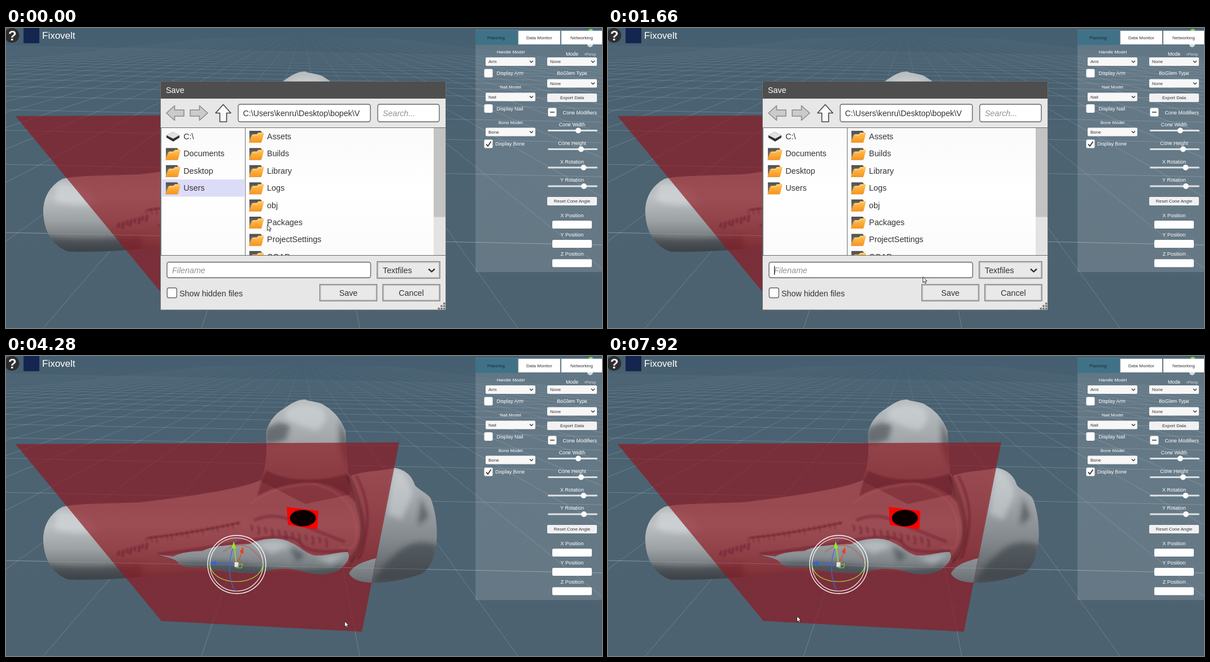
An HTML page for the animation above (8000 ms loop, 1055x531 px).

```html
<!DOCTYPE html>
<html lang="en">
<head>
<meta charset="utf-8">
<title>Save dialog</title>
<style>
  html, body { margin: 0; width: 100%; height: 100%; overflow: hidden; background: #4c6271; }
  svg { display: block; width: 100vw; height: 100vh; }
  text { font-family: "Liberation Sans", Arial, sans-serif; white-space: pre; }
</style>
</head>
<body>
<svg id="stage" viewBox="0 0 1055 531" preserveAspectRatio="none"></svg>
<script>
const LOOP = 8000;

// ---- drawing helpers
const text = (x, y, str, size, fill = '#fff', more = '') =>
  `<text x="${x}" y="${y + size * 0.355}" font-size="${size}" fill="${fill}" ${more}>${str}</text>`;
const mid = (x, y, str, size, fill) => text(x, y, str, size, fill, 'text-anchor="middle"');
const rect = (x, y, w, h, fill, more = '') =>
  `<rect x="${x}" y="${y}" width="${w}" height="${h}" fill="${fill}" ${more}/>`;
const circle = (x, y, r, fill, more = '') =>
  `<circle cx="${x}" cy="${y}" r="${r}" fill="${fill}" ${more}/>`;
const path = (d, fill, more = '') => `<path d="${d}" fill="${fill}" ${more}/>`;
const line = (d, stroke, width = 1, more = '') =>
  path(d, 'none', `stroke="${stroke}" stroke-width="${width}" ${more}`);
const group = (id, body, more = '') => `<g id="${id}" ${more}>${body}</g>`;
const range = (n, fn) => Array.from({ length: n }, (_, i) => fn(i)).join('');
const gradient = (id, y1, y2, ...stops) =>
  `<linearGradient id="${id}" gradientUnits="userSpaceOnUse" x1="0" x2="0" y1="${y1}" y2="${y2}">` +
  stops.map(([at, c, o = 1]) => `<stop offset="${at}" stop-color="${c}" stop-opacity="${o}"/>`).join('') + '</linearGradient>';
const clip = (id, d) => `<clipPath id="${id}">${path(d, '#000')}</clipPath>`;
const blur = (id, amount) => `<filter id="${id}" filterUnits="userSpaceOnUse" x="0" y="0" width="1055" height="531">` +
  `<feGaussianBlur stdDeviation="${amount}"/></filter>`;

const PLANE = 'M17 156L696 153L630 488L275 469Z';
const SHAFT = 'M66 328C65 303 76 280 100 267C120 261 190 261 236 259C290 253 330 247 360 242C400 235 430 229 453 219' +
  'L606 207C628 240 636 300 622 350L606 366C590 385 550 389 500 381L400 384C350 378 320 380 285 387' +
  'C225 393 170 397 112 396C88 389 68 367 66 328Z';
const TALUS = 'M452 222C459 200 461 180 461 157L460 139C462 118 479 100 492 93C503 85 515 77 529 77' +
  'C540 82 553 79 566 89C580 97 594 113 601 133L604 190L609 245L530 262Z';
const HEEL = 'M608 213C637 202 660 205 688 198C704 201 718 209 724 229C735 240 751 246 753 255' +
  'C762 281 764 307 762 330C760 353 752 376 735 386C690 401 645 406 622 399L607 384L621 350C636 305 626 250 608 213Z';
const FRONT = 'M265 351L296 355C310 347 330 346 348 345C367 335 400 334 431 333C450 323 485 318 506 331' +
  'C519 336 529 349 546 353C570 354 588 346 605 347C612 359 600 369 592 376C578 387 553 389 532 383' +
  'C500 374 480 375 453 383C420 387 380 381 345 373C325 376 310 373 305 366C302 360 285 355 265 351Z';
const SPUR = 'M607 385C615 371 628 365 655 358L647 401C625 401 612 394 607 385Z';

const defs = '<defs>' +
  gradient('sky', 0, 531, [0, '#465f70'], [0.4, '#4c6372'], [1, '#4d6270']) +
  gradient('depth', 15, 170, [0, '#d5e0e6', 0.04], [0.4, '#d5e0e6', 0.16], [1, '#d5e0e6', 0.3]) +
  gradient('shaft', 258, 397, [0, '#b0b5b8'], [0.3, '#bcc0c3'], [0.6, '#9ca1a4'], [0.83, '#74797c'], [1, '#4a4e51']) +
  gradient('talus', 77, 240, [0, '#b9bec0'], [0.35, '#a7acaf'], [0.6, '#969b9f'], [1, '#74797d']) +
  gradient('heel', 198, 405, [0, '#b4b9bc'], [0.3, '#9fa4a8'], [0.65, '#7f8589'], [1, '#52575b']) +
  gradient('front', 320, 388, [0, '#a0a5a8'], [0.5, '#8a8f93'], [1, '#666c70']) +
  gradient('spur', 358, 402, [0, '#8f9498'], [1, '#686e72']) +
  gradient('back', 0, 22, [0, '#4a4a4a'], [1, '#8a8a8a']) +
  gradient('flap', 4, 22, [0, '#ffc45a'], [1, '#f7941d']) +
  gradient('list', 177, 402, [0, '#fafafa'], [0.5, '#ffffff'], [1, '#fbfbfb']) +
  blur('soft', 5) + blur('fine', 1.2) +
  clip('inPlane', PLANE) + clip('inShaft', SHAFT) + clip('inTalus', TALUS) + clip('inHeel', HEEL) + clip('inFront', FRONT) +
  clip('inList', 'M275 177H778V402H275Z') + '</defs>';

// ---- 3D scene
function grid() {
  const across = range(22, i => {
    const y = 724 / (i + 2);
    return line(`M0 ${y}L1055 ${y + 22}`, '#d5e0e6', 0.8, `opacity="${Math.max(0.08, 0.32 - i * 0.014)}"`);
  });
  const away = range(33, i => {
    const dx = (i - 16) * 280 - 179;
    return line(`M${525 + dx * 0.035} 18L${525 + dx} 531`, 'url(#depth)', 0.8);
  });
  return across + away;
}

// blurred light and dark patches inside one bone part
const shade = (part, dark, light) => `<g clip-path="url(#in${part})"><g filter="url(#soft)">` +
  path(dark, '#2e3438', 'opacity=".5"') + path(light, '#e4e8ea', 'opacity=".4"') + '</g></g>';

function bone() {
  const teeth = range(8, i => line(`M${201 + i * 7} ${345 - i * 2}l${-3 + i % 3} ${8 + i % 2 * 4}`, '#5b1a27', 4, 'opacity=".5"')) +
    range(19, i => line(`M${247 + i * 9} ${322 - i * 1.6}l3 ${6 + i % 3 * 3}`, '#5b1a27', 2.2, 'opacity=".38"')) +
    range(12, i => line(`M${433 + i * 12} ${299 + i * 2.2}q5 5 2 ${10 + i % 2 * 5}`, '#5b1a27', 4, 'opacity=".38"'));
  const tinted = path('M452 222L461 203Q490 218 530 219T606 208L618 258Q582 222 530 224Q478 229 445 248Z', '#5b1723', 'opacity=".45"') +
    line('M606 213Q622 248 630 290T609 362', '#4e1520', 9, 'opacity=".36"') +
    line('M620 212Q646 260 638 310T622 357', '#4e1520', 5, 'opacity=".26"') +
    line('M432 262Q480 226 548 227Q614 246 619 300T591 337', '#b4606a', 4, 'opacity=".25"') +
    line('M250 322Q330 314 414 295', '#561520', 3, 'opacity=".5"') +
    line('M439 291Q472 276 506 291T600 329', '#561520', 6, 'opacity=".25"') +
    line('M268 351Q350 342 430 327T522 332T606 344', '#561520', 6, 'opacity=".28"') + teeth;
  return path(SHAFT, 'url(#shaft)') +
    shade('Shaft', 'M68 368Q130 378 240 368V400H80Z', 'M90 276Q120 270 150 290L165 312Q110 318 85 305Z') +
    path(HEEL, 'url(#heel)') +
    shade('Heel', 'M690 350Q720 320 765 335V400H650Q665 370 690 350ZM735 250L748 285L729 300Z',
      'M686 198Q712 206 720 245L700 290L675 280Z') +
    path(TALUS, 'url(#talus)') +
    shade('Talus', 'M458 128L482 118L503 122L496 148L474 155H455ZM590 110L606 150V205L590 160Z',
      'M495 96Q530 78 560 94Q575 115 550 132Q520 126 495 110Z') +
    path(PLANE, '#8f1922', 'opacity=".69"') +
    `<g clip-path="url(#inPlane)">${group('tint', tinted, 'filter="url(#fine)"')}</g>` +
    path(FRONT, 'url(#front)') +
    shade('Front', 'M300 366Q370 360 450 372T595 370V392H300ZM500 335L530 352L515 365Z',
      'M440 335Q480 318 504 337L470 350ZM548 357L604 350L575 368Z') +
    path(SPUR, 'url(#spur)') +
    line('M0 362L1055 384', '#d5e0e6', 0.8, 'opacity=".25"');
}

const marker = path('M497 267L553 274L551 307L499 299Z', '#fe0000') +
  '<ellipse cx="525.5" cy="287" rx="23" ry="14.5" fill="#0b0000"/>';

const gizmo =
  circle(408.5, 369, 51.5, 'none', 'stroke="#fff" stroke-width="1.3"') +
  circle(408, 369, 47, 'none', 'stroke="#f4f4f4" stroke-width="1.2"') +
  line('M361 367C362 410 453 410 455 367', '#a4dc3a', 1.2) +
  line('M384 347Q423 316 454 363', '#d9442f', 1) +
  line('M409 323Q385 369 404 415', '#3d66d8', 1.2) +
  line('M408 369L404 338', '#9be628', 1.4) + line('M408 369L418 348', '#e8452e', 1.4) + line('M406 369L370 367', '#3a6be6', 1.4) +
  path('M403 328L407 340Q403 342 399.500 340Z', '#8cf019') +
  path('M420 338L420.500 349Q416 350 414 346Z', '#f13c20') +
  path('M361 367L371 363Q373 367 371 371Z', '#2f62df') +
  rect(404.5, 365, 7, 8.5, '#e4e4e4') + path('M411 369L419 368L417 375L408 375Z', 'none', 'stroke="#8ed62a"') +
  line('M409 365L413 361L418 363', '#ef4a32', 1);

// ---- side panel
const label = (y, str, size = 8.9, x = 1002) => mid(x, y, str, size);
const drop = (x, y, str) => rect(x, y - 7.5, 88, 15, '#f7f7f7', 'rx="2"') + text(x + 5, y, str, 8, '#333') +
  line(`M${x + 78} ${y - 1.5}l3 3l3 -3`, '#333', 1.3);
const button = (y, str) => rect(958, y - 7.5, 88, 15, '#f1f1f3', 'rx="2"') + mid(1002, y, str, 8, '#333');
const box = (x, y, s = 15) => rect(x, y - s / 2, s, s, '#fdfdfd', 'rx="2.5"');
const slider = (y, x) => rect(959, y - 1.5, 88, 3, '#dfe3e6', 'rx="1.5"') + circle(x, y, 5, '#fafafa');

const panel =
  line('M1035 8V30', '#8b9ba4', 1) + path('M1031 3Q1035 0 1039 3L1036 10Z', '#7be03a') + circle(1034, 29, 5, '#d8dcde') +
  rect(831, 3, 224, 429, '#d6dade', 'opacity=".19"') +
  rect(831, 4, 74, 26, '#3f7287') + rect(907, 5, 74, 24, '#fff') + rect(983, 5, 72, 24, '#fff') +
  mid(867.5, 17, 'Planning', 8, '#1c2b33') + mid(944, 17, 'Data Monitor', 8, '#333') + mid(1019, 17, 'Networking', 8, '#333') +
  label(42, 'Handle Model', 8, 893.5) + drop(849, 59.5, 'Arm') + box(846.5, 80) + text(868.5, 80, 'Display Arm', 8.9) +
  label(104.5, 'Nail Model', 8, 893) + drop(849, 122, 'Nail') + box(846.5, 142.5) + text(868.5, 142.5, 'Display Nail', 8.9) +
  label(167, 'Bone Model', 8, 893) + drop(849, 184, 'Bone') + box(846.5, 205) + text(866, 205, 'Display Bone', 8.9) +
  line('M850 205.5L853 209L858.500 201', '#333', 1.8) +
  label(45.5, 'Mode') + text(1023, 47, '&lt;Persp', 6.6, '#d5dbdf') + drop(958, 59.5, 'None') +
  label(80, 'BoGlem Type') + drop(958, 98, 'None') + button(123.5, 'Export Data') +
  box(959.5, 149) + line('M963 149H971', '#333', 1.4) + text(985.5, 149.5, 'Cone Modifiers', 9) +
  label(171, 'Cone Width') + slider(181.5, 1013) + label(203.5, 'Cone Height') + slider(214.5, 1018) +
  label(236.5, 'X Rotation', 9) + slider(247, 1022.5) + label(269, 'Y Rotation', 9) + slider(280, 1023) +
  button(306.5, 'Reset Cone Angle') +
  ['X', 'Y', 'Z'].map((axis, i) => label(331.5 + i * 34.1, axis + ' Position', 9.1) +
    rect(967, 341 + i * 34.1, 70, 14, '#fefefe', 'rx="2.5"')).join('');

const header = circle(10.5, 13, 13, '#2e2e30') +
  text(4, 13.5, '?', 24, '#fff', 'font-weight="bold"') +
  rect(31, 0, 28, 27, '#14264f') + text(64, 13, 'Fixovelt', 17);

// ---- save dialog
const FS = 14.3, INK = '#333';
const folder = (x, y) => `<g transform="translate(${x} ${y - 11})">` +
  path('M1 1H21L24 5L22 22H1Z', 'url(#back)') +
  path('M0 22L5 9Q6 7 8 7H14L17 4H25Q27 4 26.500 6L23 20Q22 22 20 22Z', 'url(#flap)') +
  line('M7 9L15 8.500L18 6H25', '#ffe0a0', 1) + '</g>';
const row = (x, i, str) => folder(x, 192 + i * 30.4) + text(x + 32.3, 192 + i * 30.4, str, FS, INK);
const field = (id, x, y, w, h) => rect(x, y, w, h, '#fff', `id="${id}" rx="3.5" stroke="#666" stroke-width="1.4"`);
const push = (id, x, y, w, h, str) => rect(x, y, w, h, '#e9e9e9', `id="${id}" stroke="#717171" stroke-width="1.3"`) +
  rect(x + 1.7, y + 1.7, w - 3.4, h - 3.4, 'none', 'stroke="#bcbcbc"') + (str ? mid(x + w / 2, y + h / 2, str, FS, INK) : '');
const hint = 'font-style="italic"';
const arrow = 'M284 150.500L298.500 137.500V145H315V156H298.500V163.500Z';
const faded = 'stroke="#8c8c8c" stroke-width="1.6" stroke-linejoin="round"';

const dialog =
  rect(273.5, 95, 505, 404, '#e7e7e7', 'stroke="#6f6f6f"') + rect(274, 95, 504, 30, '#4e4e4e') + text(283, 110, 'Save', FS) +
  path(arrow, '#cbcbcb', faded) + path(arrow, '#cbcbcb', faded + ' transform="translate(641 0) scale(-1 1)"') +
  path('M384.500 135.500L398 150.500H390.500V166H378.500V150.500H371Z', '#fbfbfb', 'stroke="#444" stroke-width="1.6" stroke-linejoin="round"') +
  field('route', 411, 135, 234, 31) + text(419.5, 151, 'C:\\Users\\kenru\\Desktop\\bopek\\V', 14.2, INK) +
  field('search', 658, 135, 109, 31) + text(667, 151, 'Search...', FS, '#929292', hint) +
  rect(274.5, 176.5, 503, 226, 'url(#list)', 'stroke="#6c6c6c"') +
  rect(276, 268, 146, 30.5, '#dddcf8', 'id="users"') + rect(424, 329, 333, 30.5, '#dddcf8', 'id="packages"') +
  group('lists',
    path('M284 190L295 184L307 190L296 196Z', '#e2e2e2', 'stroke="#999" stroke-width=".5"') +
    path('M284 190L296 196L307 190V194L296 201L284 194Z', '#303030') +
    text(314.3, 192, 'C:\\', FS, INK) +
    ['Documents', 'Desktop', 'Users'].map((s, i) => row(282, i + 1, s)).join('') +
    ['Assets', 'Builds', 'Library', 'Logs', 'obj', 'Packages', 'ProjectSettings', 'COAP'].map((s, i) => row(429.8, i, s)).join('') +
    rect(757, 177, 21, 225, '#e3e3e3') + rect(757, 177, 21, 157.5, '#c3c3c3'), 'clip-path="url(#inList)"') +
  line('M423.500 176V402', '#6c6c6c') +
  field('name', 285, 414.5, 360.5, 27.5) + text(294, 429, 'Filename', FS, '#929292', hint + ' id="hint"') +
  text(293.5, 429, '', FS, INK, 'id="typed"') + rect(0, 421, 1.2, 16, '#222', 'id="caret"') +
  push('type', 657, 413.5, 111, 29.5) + text(667, 429, 'Textfiles', FS, INK) +
  line('M748 426.500L753.500 431.500L759 426.500', '#333', 2.4) +
  rect(285.3, 460, 17, 17.5, '#fff', 'rx="3" stroke="#666" stroke-width="1.4"') + text(307, 469.5, 'Show hidden files', FS, INK) +
  push('save', 555.5, 454, 101, 29, 'Save') + push('cancel', 667, 454, 101, 29, 'Cancel') +
  range(3, r => range(r + 1, c => rect(774 - c * 4.7, 486 + r * 4.5, 3.4, 3.4, '#777')));

const pointer = path('M0 0V10L2.400 7.900L4 11.500L5.700 10.700L4.100 7.300H7.200Z', '#fff', 'stroke="#222" stroke-width=".9" stroke-linejoin="round"');

const stage = document.getElementById('stage');
stage.innerHTML = defs + rect(0, 0, 1055, 531, 'url(#sky)') + grid() + bone() + marker + gizmo + panel + header +
  group('dialog', dialog) + circle(0, 0, 6, '#fff', 'id="ring" fill-opacity=".35" stroke="#444" stroke-width="1"') +
  group('pointer', pointer);

// ---- timeline: time, pointer x, pointer y, changed state
const steps = [
  [0, 462, 348, { open: 1, users: 1, row: 0, ring: 0, name: '#fff', typed: '', caret: 0, save: '#e9e9e9' }],
  [160, 466, 348, { users: 0, row: 1 }],
  [700, 488, 353],
  [840, 512, 385, { row: 0 }],
  [960, 542, 428],
  [1080, 561, 453],
  [1230, 557, 440],
  [1360, 557, 440, { ring: 1 }],
  [1510, 557, 440, { ring: 0, name: '#e6e6e6', caret: 1 }],
  [1660, 557, 440, { name: '#fff' }],
  [1860, 558, 440],
  [2120, 558, 440, { caret: 0 }],
  [2430, 558, 440, { typed: 'da', caret: 1 }],
  [2710, 558, 440, { typed: 'dat' }],
  [2830, 562, 443, { typed: 'data' }],
  [2950, 566, 446],
  [3090, 580, 456, { caret: 0 }],
  [3210, 594, 465],
  [3340, 599, 468],
  [3920, 599, 468, { ring: 1 }],
  [4040, 599, 468, { save: '#d4d4d4' }],
  [4160, 599, 468, { ring: 0, save: '#c4c4c4' }],
  [4280, 599, 469, { open: 0 }],
  [5220, 598, 468],
  [5470, 599, 468],
  [5610, 492, 492],
  [5740, 404, 500],
  [6020, 402, 501],
  [6170, 352, 486],
  [6290, 301, 465],
  [6410, 277, 454],
  [7280, 314, 497],
  [7400, 346, 519],
  [7550, 347, 491],
  [7800, 340, 474],
  [7920, 334, 460]
];
let last = {};
const poses = steps.map(([t, x, y, change]) => last = { ...last, ...change, t, x, y });

const $ = id => document.getElementById(id);
const show = (id, on) => $(id).setAttribute('visibility', on ? 'inherit' : 'hidden');
const caretX = { '': 294, da: 309.6, dat: 313.6, data: 321.6 };

function draw(p) {
  show('dialog', p.open);
  show('users', p.users);
  show('packages', p.row);
  show('hint', !p.typed);
  show('caret', p.caret);
  show('ring', p.ring);
  $('typed').textContent = p.typed;
  $('caret').setAttribute('x', caretX[p.typed]);
  $('name').setAttribute('fill', p.name);
  $('save').setAttribute('fill', p.save);
  $('pointer').setAttribute('transform', `translate(${p.x + 0.5} ${p.y + 0.5})`);
  $('ring').setAttribute('transform', `translate(${p.x + 1} ${p.y})`);
}

const start = performance.now();
let shown;
function tick() {
  const t = (performance.now() - start) % LOOP;
  const pose = poses.findLast(p => p.t <= t) || poses[0];
  if (pose !== shown) draw(shown = pose);
  requestAnimationFrame(tick);
}
tick();
</script>
</body>
</html>
```
